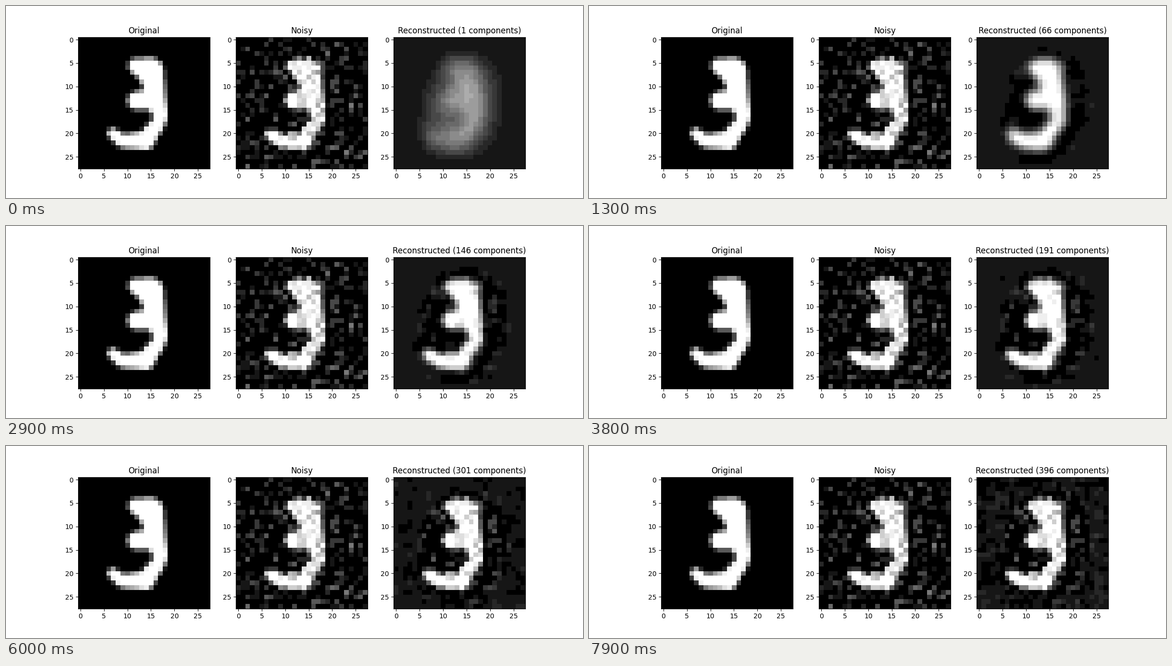
A matplotlib script that plays this animation: 1200 px wide and 400 px high, repeating every 8 s.

```python
import numpy as np
import matplotlib.pyplot as plt
from matplotlib.animation import FuncAnimation

N = 28
STEPS = 80
BASE = 22          # grey of an empty reconstructed cell
NOISE = 45         # standard deviation of the added noise
rows, cols = np.mgrid[0:N, 0:N]

# Brush strokes of the digit: x, y and brush radius in cell units
SPINE = [(12.2, 6.1, 1.6), (15.4, 7.2, 2.8), (16.2, 10.5, 2.2), (16.3, 13, 2.3),
         (17.6, 16.8, 1.45), (17, 18.3, 1.45), (14.3, 22, 1.95),
         (9.3, 22.1, 1.35), (7.4, 20.5, 1.15)]
BAR = [(12.4, 13.5, 1.9), (16.3, 13, 2.3)]


def draw_digit(sub=8, dabs=24):
    """Area of every cell covered by the brush, 0 to 255."""
    t = (np.arange(N * sub) + 0.5) / sub
    x, y = np.meshgrid(t, t)
    ink = np.zeros(x.shape, bool)
    for stroke in (SPINE, BAR):
        for a, b in zip(stroke, stroke[1:]):
            for cx, cy, r in np.linspace(a, b, dabs):
                ink |= (x - cx) ** 2 + (y - cy) ** 2 < r ** 2
    return 255 * ink.reshape(N, sub, N, sub).mean(axis=(1, 3))


def blur(img, sigma):
    i = np.arange(N)
    g = np.exp(-((i[:, None] - i) ** 2) / (2 * sigma ** 2))
    g /= g.sum(axis=1, keepdims=True)
    return g @ img @ g.T


def posterize(img):
    """Snap to even grey steps; everything below the first one is black."""
    level = np.round((img - 6) / 16.6)
    return np.where(level > 0, np.minimum(6 + 16.6 * level, 255), 0)


rng = np.random.default_rng(7)
digit = draw_digit()
noisy = np.clip(digit + rng.normal(0, NOISE, (N, N)), 0, 255)
grains = rng.normal(size=(2, N, N))

# Distance from the centre of a slanted superellipse, 1 on its edge
u = np.abs(cols - 15 + 0.1 * (rows - 5)) / 9
v = np.abs(rows - 14.5) / 11
dist = (u ** 2.4 + v ** 2.4) ** (1 / 2.4)

mask = 1 / (1 + np.exp((dist - 1.05) / 0.08))
blob = BASE + 65 * np.clip((1.06 - dist) / 0.6, 0, 1) + 0.33 * blur(digit, 1.4)


def reconstruct(k):
    """Mean blob at one component, sharpening into the noisy digit."""
    late = k / 400
    sigma = min(2.6, (66 / k) ** 0.6)
    signal = noisy - 0.4 * NOISE
    fine = blur(signal, sigma)
    halo = 0.8 * np.exp(-k / 250) * (fine - blur(signal, sigma + 1.6))

    turn = k / 60
    grain = blur(np.cos(turn) * grains[0] + np.sin(turn) * grains[1], sigma + 0.2)
    grain /= grain.std()
    ripple = grain * (8 * mask * (1 - late) + 11 * late ** 2 * (1 - mask))

    detail = BASE - 2 * late + mask * (fine + halo) + ripple
    mix = 1 - np.exp(-(k - 1) / 14)
    return posterize((1 - mix) * blob + mix * detail)


def title_for(k):
    return f"Reconstructed ({k} components)"


fig, axes = plt.subplots(1, 3, figsize=(12, 4), dpi=100)
panels = [("Original", posterize(digit)), ("Noisy", posterize(noisy)),
          (title_for(1), reconstruct(1))]
for ax, (title, data) in zip(axes, panels):
    image = ax.imshow(data, cmap="gray", vmin=0, vmax=255, interpolation="nearest")
    ax.set_title(title)


def update(i):
    k = 1 + 5 * i
    image.set_data(reconstruct(k))
    axes[2].set_title(title_for(k))
    return [image]


anim = FuncAnimation(fig, update, frames=STEPS, interval=100, repeat=True)
plt.show()
```
